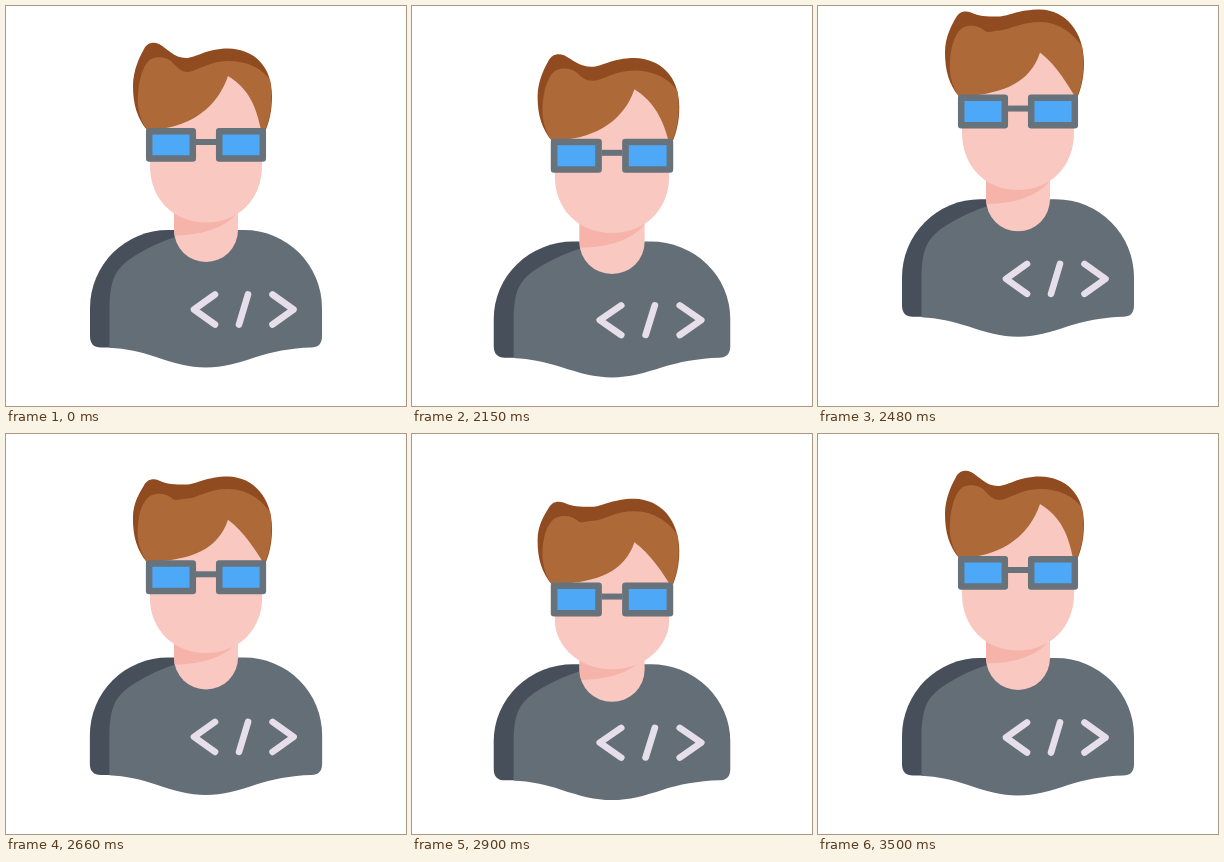
These frames come from a looping animation (400 px wide and 400 px high, 3.53 s). An HTML page:

```html
<!DOCTYPE html>
<html lang="en">
<head>
<meta charset="utf-8">
<title>Jumping coder</title>
<style>
  html, body { margin: 0; width: 100%; height: 100%; overflow: hidden; background: #fff; }
  svg { display: block; width: 100vw; height: 100vh; }
</style>
</head>
<body>
<svg viewBox="0 0 400 400">
  <defs>
    <clipPath id="neckClip"><path d="M168 190H232V224A32 32 0 0 1 168 224Z"/></clipPath>
  </defs>
  <g id="body">
    <path fill="#464f5a" d="M84 302A78 78 0 0 1 162 224H200V341.5H95Q84 341.5 84 330Z"/>
    <path fill="#636e77" d="M103.5 341.8V302C104 273 109 262 130 249Q150 237 169 231L190 224H238A78 78 0 0 1 316 302V330Q316 341.5 305 341.5C285 342 265 346 250 351C232 357 217 361.5 200 361.5C183 361.5 168 357 150 351C135 346 120 342.5 103.5 341.8Z"/>
    <path fill="none" stroke="#e6deeb" stroke-width="6.6" stroke-linecap="round" stroke-linejoin="round"
      d="M209 288.5L188 303.5L209 318.5M242 288.5L233 318.5M266.5 288.5L287.5 303.5L266.5 318.5"/>
  </g>
  <g id="neck">
    <path fill="#f8c8c1" d="M168 190H232V224A32 32 0 0 1 168 224Z"/>
    <g clip-path="url(#neckClip)">
      <path id="shade" fill="#f5b3aa" d="M160 160H240V196L232 206C218 223 195 230 160 229.5Z"/>
    </g>
  </g>
  <g id="head">
    <path id="hairBack" fill="#914b20"/>
    <path id="face" fill="#f8c8c1"/>
    <path id="hairFront" fill="#ad6a38"/>
    <g fill="#4da9f8" stroke="#67727b" stroke-width="6.5" stroke-linejoin="round">
      <rect x="143.2" y="125.2" width="43.6" height="27.4"/>
      <rect x="213.2" y="125.2" width="43.6" height="27.4"/>
      <path stroke-width="6" d="M190 136H210"/>
    </g>
  </g>
</svg>
<script>
const LOOP = 3530, REST = 2030, STEP = 30, STEPS = 50, HALF = 10;

const el = id => document.getElementById(id);
const set = (id, name, value) => el(id).setAttribute(name, value);
const clamp = x => Math.max(0, Math.min(1, x));
const easeInOut = p => (1 - Math.cos(Math.PI * clamp(p))) / 2;
const easeOut = p => 1 - (1 - p) ** 3;

// Swings from peak to peak, one each HALF steps; starts and ends at zero
function swing(k, delay, peaks) {
  const first = HALF / 2 + delay;
  if (k < first) return peaks[0] * easeOut(k / first);
  const i = Math.floor((k - first) / HALF);
  const from = first + i * HALF, to = Math.min(from + HALF, STEPS);
  const a = peaks[i], b = peaks[i + 1] || 0;
  return a + (b - a) * easeInOut((k - from) / (to - from));
}

function drawHair(flat, press) {
  const tuft = y => y + 2 * flat + press;
  const dip = y => y - 8 * flat + press;
  const crest = y => y - 5.5 * flat + press / 2;
  const part = 70 + 10 * flat + Math.max(0, press) * .7;
  set('hairBack', 'd', `M141 124C131 112 127 98 127 80
    C127 64 134 ${tuft(50)} 138 ${tuft(43)}C141 ${tuft(37)} 147 ${tuft(35.5)} 153 ${tuft(38)}
    C161 ${tuft(42)} 168 ${dip(52)} 180 ${dip(52)}C190 ${dip(52)} 200 ${crest(42.5)} 222 ${crest(42.5)}
    C248 ${crest(43)} 266 60 266 90C266 106 263 116 259 126Z`);
  set('hairFront', 'd', `M141 124C133 112 131 100 132 88
    C133 72 138 ${tuft(57)} 145 ${tuft(53)}C152 ${tuft(50)} 160 ${tuft(51)} 165 ${tuft(55)}
    C170 ${tuft(60)} 174 ${dip(66)} 182 ${dip(66)}C192 ${dip(65)} 203 ${crest(55)} 222 ${crest(55)}
    C242 ${crest(55)} 257 63 264 74C267 92 265 112 258 126L${255 + 2 * flat} 124
    C250 ${100 + 13 * flat} ${243 - 4 * flat} ${part + 13} 222 ${part}C212 ${part + 30} 186 121 148 123.5Z`);
}

function draw(k) {
  const body = swing(k, .4, [10, -31, 10, -2.5, 3]);
  const head = swing(k, 1.7, [11, -34, 36, -2.5, 3]);
  const hair = swing(k, 1.7, [11, -34, 40, -5.5, 3]);
  const flat = easeInOut((k - 3) / 6) - easeInOut((k - 30) / 6);
  const squash = Math.max(0, .0014 * body + .0005 * head);
  const lag = head - body;
  const sink = .35 * Math.max(0, lag - 7);
  const wide = y => `translate(200 ${y}) scale(${1 + squash} 1) translate(-200 0)`;

  set('body', 'transform',
    `translate(200 ${361 + body}) scale(${1 + squash} ${1 - .6 * squash}) translate(-200 -361)`);
  set('neck', 'transform', wide(body + 105 * squash + sink));
  set('shade', 'transform', `translate(0 ${(.65 * lag - sink) / 2})`);
  set('head', 'transform', wide(head));

  const chin = 216.5 - .35 * lag;
  set('face', 'd', `M144 160V118C150 98 200 72 222 68C240 76 256 100 256 125V160
    C256 ${chin - 24} 233 ${chin} 200 ${chin}S144 ${chin - 24} 144 160Z`);
  drawHair(flat, hair - head);
}

const start = performance.now();
function tick() {
  const t = (performance.now() - start) % LOOP;
  draw(t < REST ? 0 : Math.min(STEPS, Math.floor((t - REST) / STEP) + 1));
  requestAnimationFrame(tick);
}
tick();
</script>
</body>
</html>
```
